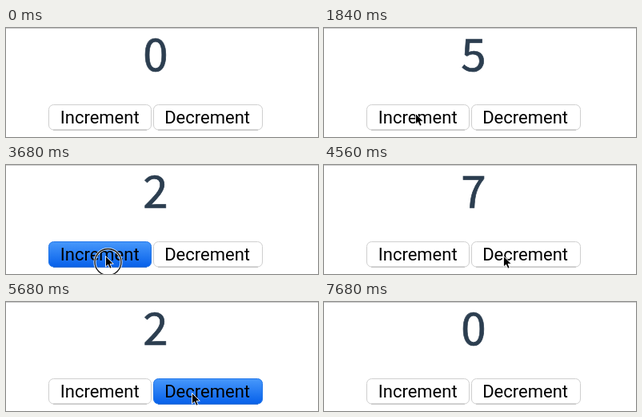
These frames come from a looping animation (390 by 137 pixels, 8.32 s). An HTML page:

```html
<!DOCTYPE html>
<html lang="en">
<head>
<meta charset="utf-8">
<title>Counter</title>
<style>
html, body { margin: 0; width: 100%; height: 100%; overflow: hidden; background: #fff; }
svg { display: block; }
text { text-anchor: middle; }
#count {
  font: 56.5px "Noto Sans CJK JP", "Noto Sans CJK SC", "Noto Sans", sans-serif;
  fill: #2c3e50; stroke: #2c3e50; stroke-width: .7;
}
.button text { font: 22px Roboto, Arial, sans-serif; fill: #000; }
.button rect { fill: #fff; stroke: #cfcfcf; }
.button path { stroke: #b9b9b9; }
.button.pressed rect { fill: url(#blue); stroke: #1f75ea; }
.button.pressed path { stroke: #0a55cc; }
</style>
</head>
<body>
<svg width="390" height="137" viewBox="0 0 390 137">
  <defs>
    <linearGradient id="blue" x2="0" y2="1">
      <stop stop-color="#4798fb"/>
      <stop offset="1" stop-color="#0660ea"/>
    </linearGradient>
  </defs>
  <rect width="390" height="1" fill="#cdcdcd"/>
  <text id="count" x="187" y="54">0</text>
  <g class="button">
    <rect x="53.5" y="96.5" width="128" height="31.5" rx="6"/>
    <path d="M59 128.2H176"/>
    <text x="117.2" y="120.4">Increment</text>
  </g>
  <g class="button">
    <rect x="184.5" y="96.5" width="136" height="31.5" rx="6"/>
    <path d="M190 128.2H315"/>
    <text x="251.6" y="120.4">Decrement</text>
  </g>
  <g id="pointer">
    <g id="ring" fill="none">
      <circle cx="3.5" cy="8" r="16.5" stroke="#fff" stroke-opacity=".85" stroke-width="3.2"/>
      <circle cx="3.5" cy="8" r="16.5" stroke="#111" stroke-width="1.3"/>
    </g>
    <path d="M.5 .5V14L3.6 11.2 5.8 16.2 8.2 15.2 6.1 10.3H10.3Z" fill="#000" stroke="#fff" stroke-width=".9"/>
  </g>
</svg>
<script>
const LOOP = 8320, STEP = 80, HOLD = 80;
const INC = 1, DEC = -1;

const burst = (start, clicks, by, gap = 160, ringed = false) => ({ start, clicks, by, gap, ringed });
const bursts = [
  burst(880, 2, INC), burst(1360, 3, INC),
  burst(2800, 3, DEC),
  burst(3680, 2, INC, 160, true), burst(4080, 3, INC, 80, true),
  burst(4640, 5, DEC, 140, true),
  burst(5680, 1, DEC), burst(7040, 1, DEC)
];

// The pointer rests between moves; it begins and ends off stage.
const move = (start, span, x, y) => ({ start, span, x, y });
const moves = [
  move(400, 400, 115, 110), move(1680, 80, 114, 107),
  move(2240, 400, 235, 107), move(2960, 160, 234, 114),
  move(3440, 160, 124, 114), move(4400, 220, 232, 114),
  move(6000, 160, 229, 119), move(7360, 80, 227, 124),
  move(7600, 80, 227, 140)
];

const $ = id => document.getElementById(id);
const [incButton, decButton] = document.querySelectorAll(".button");
const easeOut = k => 1 - (1 - k) ** 2;

function pointerAt(t) {
  let x = 400, y = 75;
  for (const m of moves) {
    const k = easeOut(Math.min(1, Math.max(0, (t - m.start) / m.span)));
    x += (m.x - x) * k;
    y += (m.y - y) * k;
  }
  return [x, y];
}

// Each click counts when its button is let go.
function counterAt(t) {
  const state = { value: 0, held: 0, ringed: false };
  for (const { start, clicks, by, gap, ringed } of bursts) {
    for (let i = 0; i < clicks; i++) {
      const age = t - start - i * gap;
      if (age >= HOLD) state.value += by;
      else if (age >= 0) Object.assign(state, { held: by, ringed });
    }
  }
  return state;
}

function draw(now) {
  const t = Math.floor(now % LOOP / STEP) * STEP;
  const { value, held, ringed } = counterAt(t);
  $("count").textContent = value;
  incButton.classList.toggle("pressed", held === INC);
  decButton.classList.toggle("pressed", held === DEC);
  $("ring").style.display = ringed ? "" : "none";
  $("pointer").setAttribute("transform", `translate(${pointerAt(t)})`);
}

const begin = performance.now();
function tick() {
  draw(performance.now() - begin);
  requestAnimationFrame(tick);
}
tick();
</script>
</body>
</html>
```
